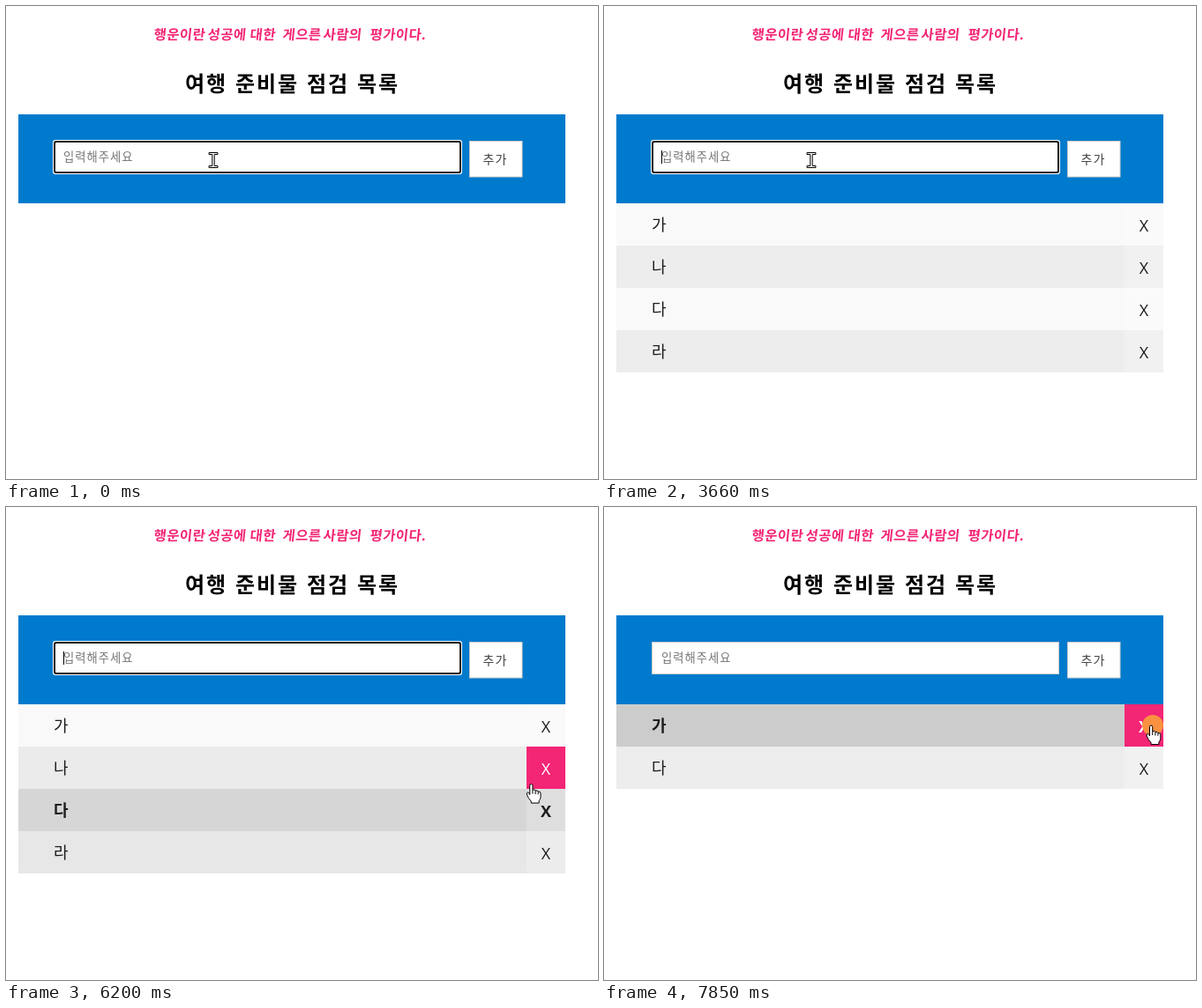
Animation, 671 px wide and 537 px high, one loop 7990 ms. Source, as an HTML page:

```html
<!DOCTYPE html>
<html lang="ko">
<head>
<meta charset="utf-8">
<title>여행 준비물 점검 목록</title>
<style>
  html, body { margin: 0; width: 100%; height: 100%; overflow: hidden; background: #fff; }
  svg { position: absolute; left: 0; top: 0; display: block; }
  text { font-family: "Noto Sans CJK KR", "Noto Sans CJK", "Noto Sans CJK JP", sans-serif; white-space: pre; }
  .quote { font-size: 15.5px; font-weight: 700; letter-spacing: .4px; fill: #f32575; }
  .title { font-size: 24px; font-weight: 700; letter-spacing: 1.9px; word-spacing: .4px; }
  .field { font-size: 13.33px; letter-spacing: 1px; }
  .button { font-size: 14px; letter-spacing: 1px; fill: #444; }
  .item { font-size: 18px; fill: #1c1c1c; }
  .close { font-family: "Open Sans", sans-serif; }
  .cursor { fill: #fff; stroke: #000; stroke-width: 1; stroke-linejoin: round; }
</style>
</head>
<body>
<svg id="stage" width="671" height="537" viewBox="0 0 671 537">
  <g class="quote" transform="translate(0 38) skewX(-6)">
    <text x="167">행운이란</text><text x="228">성공에</text><text x="276">대한</text>
    <text x="313">게으른</text><text x="359">사람의</text><text x="412">평가이다.</text>
  </g>
  <text class="title" x="203" y="96.5">여행 준비물 점검 목록</text>

  <rect x="14" y="123" width="620" height="101" fill="#007acc"/>
  <rect x="54.5" y="153.5" width="461" height="36" fill="#fff" stroke="#ccc"/>
  <g id="focus">
    <rect x="53" y="152" width="464" height="39" rx="3" fill="#fff"/>
    <rect x="55" y="154" width="460" height="35" rx="2" fill="#fff" stroke="#101010" stroke-width="2"/>
  </g>
  <text id="hint" class="field" x="65" y="176" fill="#757575">입력해주세요</text>
  <g id="typing">
    <text id="typed" class="field" x="65" y="176"></text>
    <rect x="65" y="179" width="13" height="1"/>
  </g>
  <rect id="caret" x="65" y="164" width="1" height="15"/>
  <rect x="525.5" y="153.5" width="59.5" height="40.5" fill="#fff" stroke="#ccc"/>
  <text class="button" x="540.5" y="179">추가</text>

  <g id="list"></g>
  <circle id="press" r="12" fill="#fa9140"/>
  <g id="pointer" class="cursor">
    <path id="beam" d="M-5 -8.5H5V-6.5H1.2V6.5H5V8.5H-5V6.5H-1.2V-6.5H-5Z"/>
    <path id="arrow" d="M0 0V16L3.8 12.5L6.3 18L8.8 17L6.4 11.6H11.5Z"/>
    <path id="hand" d="M-2 12V1.7Q-2 0 -.4 0T1.2 1.7V6.6Q4 5.4 4.4 7.6Q7 6.6 7.4 8.6Q10.3 8 10.3 10.6V14.5Q10.3 17 8.4 19V21.5H-.5V19.5Q-4 16 -5.2 12.2Q-6 9.4 -4.2 9.4Q-2.8 9.6 -2 12ZM1.2 6.6V11M4.4 7.6V11.5M7.4 8.6V11.8"/>
  </g>
</svg>
<script>
const LOOP = 7990, TOP = 224, ROW = 48;
const FADE = 300, BLINK = 530, PRESS = 140, FOCUSED = 70;
const $ = id => document.getElementById(id);

// key: first letter, full: whole syllable, added and removed: list changes
const ITEMS = [
  { label: '가', jamo: 'ㄱ', key: 870, full: 1270, added: 1530, removed: LOOP },
  { label: '나', jamo: 'ㄴ', key: 2060, full: 2130, added: 2460, removed: 6400 },
  { label: '다', jamo: 'ㄷ', key: 2730, full: 2800, added: 3060, removed: Infinity },
  { label: '라', jamo: 'ㄹ', key: 3400, full: 3460, added: 3660, removed: 7150 }
];

// Pointer moves: leave, arrive, x, y; it rests in between
const HOME = [235, 175];
const MOVES = [
  [4390, 4770, 600, 334],
  [4770, 4980, 607, 308],
  [5290, 5703, 444, 406],
  [5703, 5850, 470, 413],
  [5850, 6280, 608, 305],
  [6400, 6750, 613, 319],
  [6750, 6890, 614, 330],
  [7150, 7570, 620.5, 248]
];

const show = (node, on) => node.setAttribute('display', on ? 'inline' : 'none');
const set = (node, attrs) => { for (const k in attrs) node.setAttribute(k, attrs[k]); };
const clamp = x => Math.min(1, Math.max(0, x));
const smooth = x => x * x * (3 - 2 * x);

function make(tag, attrs, parent) {
  const node = document.createElementNS('http://www.w3.org/2000/svg', tag);
  set(node, attrs);
  return parent.appendChild(node);
}

// CSS "ease": cubic-bezier(.25, .1, .25, 1)
function ease(x) {
  if (x <= 0) return 0;
  if (x >= 1) return 1;
  const curve = (u, a, b) => 3 * u * (1 - u) * (1 - u) * a + 3 * u * u * (1 - u) * b + u * u * u;
  let lo = 0, hi = 1;
  for (let i = 0; i < 20; i++) {
    const mid = (lo + hi) / 2;
    if (curve(mid, .25, .25) < x) lo = mid; else hi = mid;
  }
  return curve(lo, .1, 1);
}

function pointerAt(t) {
  let [x, y] = HOME;
  for (const [leave, arrive, toX, toY] of MOVES) {
    const k = smooth(clamp((t - leave) / (arrive - leave)));
    x += (toX - x) * k;
    y += (toY - y) * k;
  }
  return [x, y];
}

const rowsAt = t => ITEMS.filter(item => t >= item.added && t < item.removed);
const hoveredAt = t => rowsAt(t)[Math.floor((pointerAt(t)[1] - TOP) / ROW)];
const pressedAt = t => ITEMS.some(item => t >= item.removed - PRESS && t < item.removed);

// Collect the hover spans of every item along the pointer path
for (const item of ITEMS) item.hovers = [];
for (let t = 0, last; t < LOOP; t += 5) {
  const item = hoveredAt(t);
  if (item === last) continue;
  if (last) last.hovers[last.hovers.length - 1][1] = t;
  if (item) item.hovers.push([t, Infinity]);
  last = item;
}

const hoverLevel = (item, t) => Math.max(0, ...item.hovers.map(([from, to]) =>
  ease((t - from) / FADE) * (1 - ease((t - to) / FADE))));

// The blink starts anew whenever the field gets focus
function caretOn(t) {
  const starts = [FOCUSED, ...ITEMS.flatMap(item => [item.added, item.removed])];
  const since = t - Math.max(...starts.filter(s => s <= t));
  return t >= FOCUSED && Math.floor(since / BLINK) % 2 === 0;
}

for (const item of ITEMS) {
  const g = item.node = make('g', { class: 'item' }, $('list'));
  item.back = make('rect', { x: 14, width: 620, height: ROW }, g);
  item.cell = make('rect', { x: 590, width: 44, height: ROW }, g);
  item.name = make('text', { x: 54, y: 31.3 }, g);
  item.close = make('text', { class: 'close', x: 612, y: 32, 'text-anchor': 'middle' }, g);
  item.name.textContent = item.label;
  item.close.textContent = 'X';
}

function drawList(t, x) {
  const rows = rowsAt(t), hovered = hoveredAt(t);
  for (const item of ITEMS) {
    const index = rows.indexOf(item);
    show(item.node, index >= 0);
    if (index < 0) continue;
    const level = hoverLevel(item, t);
    const base = index % 2 ? 237 : 249;
    const grey = Math.round(base + (204 - base) * level);
    const hot = item === hovered && x >= 590;
    set(item.node, {
      transform: `translate(0 ${TOP + index * ROW})`,
      'font-weight': level > .5 ? 700 : 400
    });
    set(item.back, { fill: `rgb(${grey},${grey},${grey})` });
    set(item.cell, { fill: hot ? '#f32575' : 'rgba(255,255,255,.2)' });
    item.close.style.fill = hot ? '#fff' : '';
  }
}

function drawField(t) {
  const item = ITEMS.find(i => t >= i.key && t < i.added);
  const pressed = pressedAt(t);
  show($('focus'), !pressed);
  show($('hint'), !item);
  show($('typing'), item);
  show($('caret'), !item && !pressed && caretOn(t));
  if (item) $('typed').textContent = t < item.full ? item.jamo : item.label;
}

function drawPointer(t, x, y) {
  const inField = x >= 54 && x < 516 && y >= 153 && y < 190;
  const kind = inField ? 'beam' : hoveredAt(t) ? 'hand' : 'arrow';
  for (const id of ['beam', 'arrow', 'hand']) show($(id), id === kind);
  set($('pointer'), { transform: `translate(${x} ${y})` });
  set($('press'), { cx: x + 1.5, cy: y });
  show($('press'), pressedAt(t));
}

function render(t) {
  const [x, y] = pointerAt(t);
  drawField(t);
  drawList(t, x);
  drawPointer(t, x, y);
}

const start = performance.now();
function tick() {
  render((performance.now() - start) % LOOP);
  requestAnimationFrame(tick);
}
tick();
</script>
</body>
</html>
```
